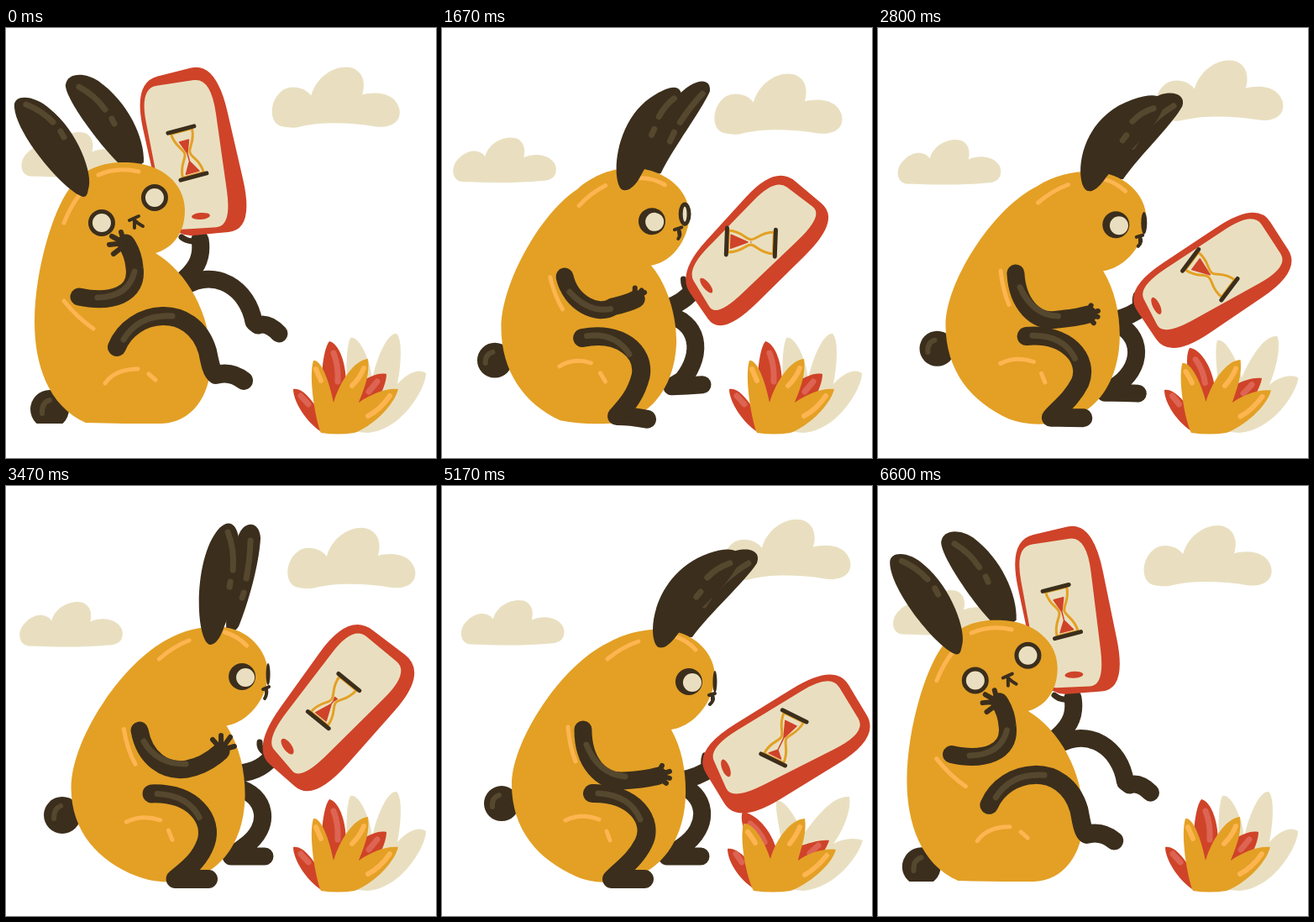
An HTML page that plays this animation: 512 px wide and 512 px high, repeating every 6630 ms.

```html
<!DOCTYPE html>
<html lang="en">
<head>
<meta charset="utf-8">
<title>Rabbit with a waiting phone</title>
<style>
html, body { margin: 0; height: 100%; overflow: hidden; background: #fff; }
svg { display: block; width: 100vw; height: 100vh; }
path { stroke-linecap: round; stroke-linejoin: round; }
</style>
</head>
<body>
<svg id="stage" viewBox="0 0 512 512">
  <clipPath id="ground"><rect width="512" height="471"/></clipPath>
</svg>
<script>
const T = 2210;
const CREAM = '#e9dfc0', GOLD = '#e3a025', RED = '#cf4329', DARK = '#3b2e1c';
const GOLD_LIGHT = '#fdb551', RED_LIGHT = '#dd6453', DARK_LIGHT = '#56482f';
const stage = document.getElementById('stage');
const movers = [];

// Smooth periodic interpolation without overshoot; `turn` is added per lap.
function sample(keys, t, turn = 0) {
  const n = keys.length;
  const at = i => {
    const lap = Math.floor(i / n), [time, v] = keys[i - lap * n];
    return [time + lap * T, v.map(x => x + lap * turn)];
  };
  let i = n - 1;
  while (keys[i][0] > t) i--;
  const [a, b, c, d] = [i - 1, i, i + 1, i + 2].map(at);
  const h = c[0] - b[0], u = (t - b[0]) / h;
  const soft = (x, y) => x * y > 0 ? 2 * x * y / (x + y) : 0;
  return b[1].map((from, j) => {
    const slope = (p, q) => (q[1][j] - p[1][j]) / (q[0] - p[0]) * h;
    const mid = slope(b, c);
    const m0 = soft(slope(a, b), mid), m1 = soft(mid, slope(c, d));
    const e = u * u * (3 - 2 * u);
    return from + mid * e + m0 * u * (1 - u) ** 2 - m1 * u * u * (1 - u);
  });
}

const NUM = /-?\d+(\.\d+)?/g;
const nums = s => s.match(NUM).map(Number);
const mix = (a, b, k) => a.map((x, i) => x + (b[i] - x) * k);
const fill = (template, v) => { let i = 0; return template.replace(NUM, () => v[i++].toFixed(2)); };

function add(tag, attrs, parent = stage) {
  const el = document.createElementNS('http://www.w3.org/2000/svg', tag);
  for (const k in attrs) el.setAttribute(k, attrs[k]);
  return parent.appendChild(el);
}
const solid = color => ({ fill: color });
const line = (color, width) => ({ fill: 'none', stroke: color, 'stroke-width': width });

// Poses: 0 fallen back, 1 rising back, 2 upright, 3 leaning low, 4 leaning halfway.
const SCHEDULE = [
  [0, 0, 1, 0], [110, 0, 1, -.16], [300, 0, 1, -.1], [650, 3, 2, -.1], [750, 3, 2, 0],
  [1030, 2, 3, 0], [1260, 4, 3, 0], [1450, 3, 2, -.1], [1990, 1, 0, 0], [2170, 0, 1, .1]
];
function track(poses) {
  const p = poses.map(nums);
  p[4] = p[4] || mix(p[2], p[3], .58);
  return SCHEDULE.map(([t, i, j, k]) => [t, mix(p[i], p[j], k)]);
}
function part(attrs, poses, shape = v => fill(poses[0], v), parent = stage) {
  const el = add('path', attrs, parent), keys = track(poses);
  movers.push(t => el.setAttribute('d', shape(sample(keys, t))));
}

const oval = ([x, y, rx, ry, deg = 0]) => {
  const a = deg * Math.PI / 180, dx = rx * Math.cos(a), dy = rx * Math.sin(a);
  const arc = `A${rx} ${ry} ${deg} 1 0 `;
  return `M${x - dx} ${y - dy}${arc}${x + dx} ${y + dy}${arc}${x - dx} ${y - dy}Z`;
};
const rounded = r => v => {
  const pt = i => [v[i % 4 * 2], v[i % 4 * 2 + 1]];
  return [0, 1, 2, 3].map(i => {
    const c = pt(i);
    return `${i ? 'L' : 'M'}${mix(c, pt(i + 3), r)}Q${c} ${mix(c, pt(i + 1), r)}`;
  }).join('') + 'Z';
};

// Clouds
const W = 2 * Math.PI / T;
function cloud(d, move) {
  const el = add('path', { d, fill: CREAM });
  movers.push(t => el.setAttribute('transform', `translate(${move(t)})`));
}
cloud('M330 117C312 115 312 85 330 73C340 67 356 70 363 80C370 55 395 42 412 47C428 53 427 70 424 79C440 75 462 76 468 95C472 113 455 119 440 117C405 111 370 112 350 117C343 119 336 118 330 117Z',
  t => [10.5 - 10.5 * Math.cos(W * (t + 75)), .5 - 8 * Math.sin(W * t)]);
cloud('M30 191C18 189 16 172 28 162C38 152 52 152 58 161C62 145 80 136 94 139C106 143 106 155 104 162C120 155 138 160 142 172C145 186 135 190 125 190C95 193 60 192 30 191Z',
  t => [-1.5 + 5.2 * Math.sin(W * t), -7 - 7.5 * Math.cos(W * (t + 30))]);

// Plant, pushed aside when the phone dips
const PUSH = [[0, [0]], [540, [0]], [650, [1.15]], [750, [1]], [920, [0]], [1340, [0]], [1450, [1.15]], [1640, [0]]];
function leaf(attrs, rest, bent) {
  const el = add('path', attrs), a = nums(rest), b = nums(bent);
  movers.push(t => el.setAttribute('d', fill(rest, mix(a, b, sample(PUSH, t)[0]))));
}
leaf(solid(CREAM),
  'M410 480C405 430 403 385 410 369C420 365 434 395 436 418C442 390 455 362 465 364C472 370 471 400 466 424C476 412 492 404 500 411C500 430 470 480 430 482Z',
  'M412 480C408 430 396 390 398 375C406 372 420 390 430 415C445 395 465 368 485 370C488 385 478 410 466 426C476 420 492 418 501 422C496 440 470 478 430 482Z');
leaf(solid(RED),
  'M377 482C358 470 342 445 342 430C352 428 362 440 372 455C376 420 376 385 385 373C397 376 406 400 405 430C415 430 435 408 453 412C453 430 435 460 410 480Z',
  'M376 482C356 472 340 448 340 432C350 430 362 442 372 455C368 425 352 400 358 388C374 390 392 410 398 432C412 438 440 420 461 422C455 440 435 462 410 480Z');
leaf(line(RED_LIGHT, 7),
  'M390 387Q396 402 395 421M351 438L360 448M442 421L432 433',
  'M367 402Q379 412 384 424M350 438L357 448M448 428L438 437');
leaf(solid(GOLD),
  'M375 482C368 465 360 415 366 396C376 394 386 425 390 446C398 420 415 395 431 394C434 415 424 435 420 446C435 435 455 428 467 430C462 450 435 475 415 482Q395 485 375 482Z',
  'M371 482C362 465 354 420 359 402C371 400 385 425 391 444C398 420 415 397 432 396C435 415 426 435 424 446C437 436 457 431 469 433C464 452 435 475 415 482Q395 485 371 482Z');
leaf(line(GOLD_LIGHT, 6),
  'M369 406Q372 413 375 420M426 405Q422 416 412 426M457 438Q445 455 431 462',
  'M364 412Q369 418 373 425M426 406Q422 416 414 426M458 440Q446 455 432 463');

// Tail and far limbs
const tail = add('g', { 'clip-path': 'url(#ground)' });
part(solid(DARK), ['52 454 23 23', '47 442 21 21', '61 400 22 22', '71 378 21 21', '67 392 22 22'], oval, tail);
part(line(DARK_LIGHT, 6), ['M43 459Q42 446 52 443', 'M36 445Q37 434 46 432', 'M53 402Q53 392 61 390', 'M60 382Q59 371 68 368', 'M57 396Q57 384 65 381'], undefined, tail);
part(line(DARK, 21), [
  'M212 308C250 285 288 310 295 350L300 354Q312 350 325 364', 'M230 320C270 310 292 335 287 384L290 384Q302 381 317 382',
  'M268 365C300 370 315 405 280 430L268 441Q288 441 308 441', 'M280 355C315 365 322 405 285 430L268 441Q288 441 308 441']);
part(line(DARK, 21), [
  'M205 305C225 290 235 275 231 252', 'M222 302C240 290 249 275 245 258',
  'M270 335C290 331 304 320 312 305', 'M285 350C300 348 312 342 322 335', 'M278 342C300 340 312 330 320 318']);
part(line(DARK, 7), [
  'M224 254Q215 254 209 249', 'M238 258Q230 260 224 252', 'M300 310Q289 306 290 295',
  'M314 338Q310 330 313 321', 'M312 320Q301 314 302 305']);

// Phone
part(solid(RED), [
  '151 65 250 40 296 240 192 250', '208 66 332 62 306 273 222 250', '392 136 487 205 352 366 280 302',
  '468 210 522 300 352 404 298 315', '408 150 503 222 366 377 292 312'], rounded(.3));
part(solid(CREAM), [
  '159 72 244 59 269 236 192 241', '217 80 309 70 289 264 220 241', '393 153 467 206 342 342 298 291',
  '463 223 506 294 345 375 317 312', '413 166 481 222 351 351 309 302'], rounded(.24));
part(solid(RED), ['232 224 11 4 -4', '253 236 11 4 8', '322 300 11 6 52', '338 336 11 4.5 68', '335 310 11 5 54'], oval);

// Hourglass
const glass = add('g');
add('path', { d: 'M-13-27C-12-10-4-8-3 0C-4 8-12 10-13 27L13 27C12 10 4 8 3 0C4-8 12-10 13-27Z', fill: CREAM, stroke: GOLD, 'stroke-width': 3 }, glass);
const sand = add('path', { fill: RED, stroke: RED, 'stroke-width': 1.5 }, glass);
add('path', { d: 'M-16-29L16-29M-16 29L16 29', ...line(DARK, 5) }, glass);
const glassPlace = track(['216 149', '259 157', '376 243', '407 300', '390 256']);
const glassAngle = [[0, [-15]], [340, [-15]], [750, [206]], [1030, [219]], [1260, [219]], [1450, [222]], [1990, [353]], [2170, [346]]];
movers.push(t => {
  glass.setAttribute('transform', `translate(${sample(glassPlace, t)}) rotate(${sample(glassAngle, t, 360)})`);
  const u = (t + 310) % T, second = u > 800;
  const left = 1 - Math.min(1, Math.max(0, (u - (second ? 960 : 0)) / 640));
  const s = second ? 1 : -1, top = Math.sqrt(left), pile = Math.sqrt(1 - left);
  const flow = left > 0 && left < 1 ? `M0 0L0 ${-s * 24}` : '';
  sand.setAttribute('d', `M0 0L${-8 * top} ${s * 21 * top}L${8 * top} ${s * 21 * top}Z` + flow +
    (pile ? `M-8 ${-s * 24}L8 ${-s * 24}L0 ${-s * (24 - 20 * pile)}Z` : ''));
});

// Far ear, body, near ear
part(solid(DARK), [
  'M135 162C112 140 71 85 71 68C73 52 95 53 110 63C145 88 165 130 164 160C155 168 143 166 135 162Z',
  'M140 160C130 130 130 65 134 48C138 31 152 28 161 42C174 70 178 120 175 158C165 166 150 164 140 160Z',
  'M240 168C240 130 250 65 272 45C284 37 294 43 293 60C288 90 268 135 255 163C250 172 244 172 240 168Z',
  'M272 178C285 130 320 90 350 77C370 72 380 80 375 92C360 115 320 150 298 180C290 180 278 182 272 178Z',
  'M262 170C262 130 268 65 282 50C292 41 302 47 303 62C301 95 288 140 277 167C272 175 266 175 262 170Z']);
part(line(DARK_LIGHT, 7), [
  'M87 70Q106 80 118 97M126 108L129 114', 'M148 50Q156 70 158 95M161 107L161 117',
  'M277 67Q273 85 262 106M257 122L255 127', 'M365 92Q345 104 328 121M318 133L312 142',
  'M291 65Q290 90 286 110M283 127L281 133']);
part(solid(GOLD), [
  'M95 470C50 450 34 400 34 350C34 290 55 220 75 192C92 165 120 159 145 160C185 161 213 185 213 217C213 245 198 262 178 268C215 290 244 340 244 395C244 440 220 470 185 471C155 471 125 471 95 470Z',
  'M100 470C60 455 40 410 40 360C40 300 65 225 85 195C100 170 128 158 152 158C195 158 225 185 224 218C222 248 207 264 190 268C225 290 251 345 251 390C250 435 225 468 190 470C160 471 130 471 100 470Z',
  'M150 464C105 450 70 415 70 365C70 300 130 210 185 177C205 165 225 162 245 163C275 165 294 195 294 220C293 250 270 275 248 279C268 305 277 340 277 370C277 420 255 465 200 471C180 472 165 469 150 464Z',
  'M160 465C115 445 83 410 83 355C83 305 140 215 197 187C220 174 245 170 262 171C300 172 326 200 325 228C323 258 300 286 273 290C287 315 291 345 290 370C288 420 262 465 205 471C185 473 172 470 160 465Z']);
part(line(GOLD_LIGHT, 5), [
  'M110 175Q132 165 158 171M69 232Q77 212 88 198M69 325Q85 345 104 358M118 423Q130 406 157 406M170 412L178 419',
  'M129 176Q151 165 176 171M83 226Q91 206 103 192M78 320Q92 341 109 353M122 417Q134 402 158 404M172 410L181 419',
  'M237 167Q253 171 265 183M162 206Q178 190 196 182M127 293Q133 318 147 336M138 403Q155 393 179 399M190 409L195 420',
  'M277 179Q292 184 302 195M197 206Q214 192 234 185M150 287Q152 310 159 328M147 398Q166 389 187 397M196 411L200 422']);
part(solid(DARK), [
  'M92 201C70 195 10 125 10 92C10 78 35 80 52 96C85 122 105 175 98 192C97 198 96 201 92 201Z',
  'M112 193C95 187 70 110 73 72C77 52 91 50 101 68C115 95 128 155 124 180C122 190 117 194 112 193Z',
  'M220 185C198 180 195 90 228 48C240 35 253 42 255 68C256 100 243 150 234 172C231 181 226 186 220 185Z',
  'M258 192C243 185 248 105 318 80C345 71 357 76 354 90C342 120 300 150 278 180C270 190 264 194 258 192Z',
  'M243 189C225 185 222 85 254 50C264 40 274 43 277 62C279 100 268 150 258 172C254 182 249 189 243 189Z']);
part(line(DARK_LIGHT, 7), [
  'M24 91Q42 98 56 112M65 123L69 130', 'M87 63Q96 75 102 97M106 107L108 116',
  'M242 54Q245 70 242 94M240 106L239 112', 'M343 92Q328 97 316 109M308 126L303 132',
  'M264 55Q272 75 270 100M267 114L266 120']);

// Face
part(solid(DARK), ['114 232 16 16', '141 223 16 16', '262 220 16 16', '294 233 16 16', '281 227 16 16'], oval);
part(solid(CREAM), ['114 232 11 11', '142 223 11 11', '266 220 11 11', '298 234 11 11', '285 228 11 11'], oval);
const farEye = ['177 202 16 16', '199 199 16 16', '292 217 2.5 13', '325 233 2.5 13', '312 224 2.5 13'];
part(solid(DARK), farEye, oval);
part(solid(CREAM), farEye, ([x, y, rx, ry]) => oval([x, y, Math.max(0, rx - 5), ry - 5]));
part(line(DARK, 4), [
  'M147 229L158 224M152 228Q157 233 163 236M153 228L153 238', 'M174 222L185 218M180 222Q184 227 187 232M180 222L182 234',
  'M288 234L294 231M291 234Q294 240 290 243M291 234L291 239', 'M318 249L325 247M322 249Q325 255 319 260M322 249L322 255',
  'M306 242L313 239M310 242Q311 248 308 253M310 242L310 248']);

// Near leg and arm
part(line(DARK, 22), [
  'M132 380C150 335 222 325 240 385C243 400 245 410 250 413Q268 408 283 420', 'M138 377C165 345 220 345 230 390C232 420 230 435 227 441Q247 440 256 456',
  'M166 367C215 365 240 395 235 425C232 445 220 455 201 468Q215 468 241 468', 'M179 366C230 365 253 400 240 425C230 445 215 455 202 468Q215 468 241 468']);
part(line(DARK_LIGHT, 7), [
  'M140 371Q158 341 198 343', 'M143 369Q165 349 198 361', 'M172 367Q207 369 222 391', 'M186 366Q224 368 236 397']);
part(line(DARK, 21), [
  'M87 320C125 328 158 318 153 285C152 272 147 262 143 256', 'M95 313C125 325 171 322 169 290C169 280 167 272 164 267',
  'M146 294C155 330 180 340 205 336C225 334 240 322 249 315', 'M168 290C168 330 190 352 215 351C235 350 248 348 258 345',
  'M159 291C165 325 190 341 215 337C233 334 246 325 256 316']);
part(line(DARK, 6), [
  'M141 256L123 258M141 256L126 248M141 256L137 243M141 259L128 269', 'M163 264L147 260M163 264L152 252M163 264L164 246M163 266L151 269',
  'M249 312L238 300M249 312L249 297M250 313L262 306M250 315L262 315', 'M256 344L262 333M258 344L271 340M258 345L271 348M258 347L267 354',
  'M256 313L246 302M256 313L256 297M257 313L267 299M258 314L272 310']);
part(line(DARK_LIGHT, 7), [
  'M109 321Q146 320 153 290', 'M111 321Q149 326 160 302', 'M152 310Q168 331 204 331', 'M172 308Q186 343 218 346', 'M164 304Q179 331 214 331']);

function frame(now) {
  const t = now % T;
  for (const move of movers) move(t);
  requestAnimationFrame(frame);
}
frame(performance.now());
</script>
</body>
</html>
```
